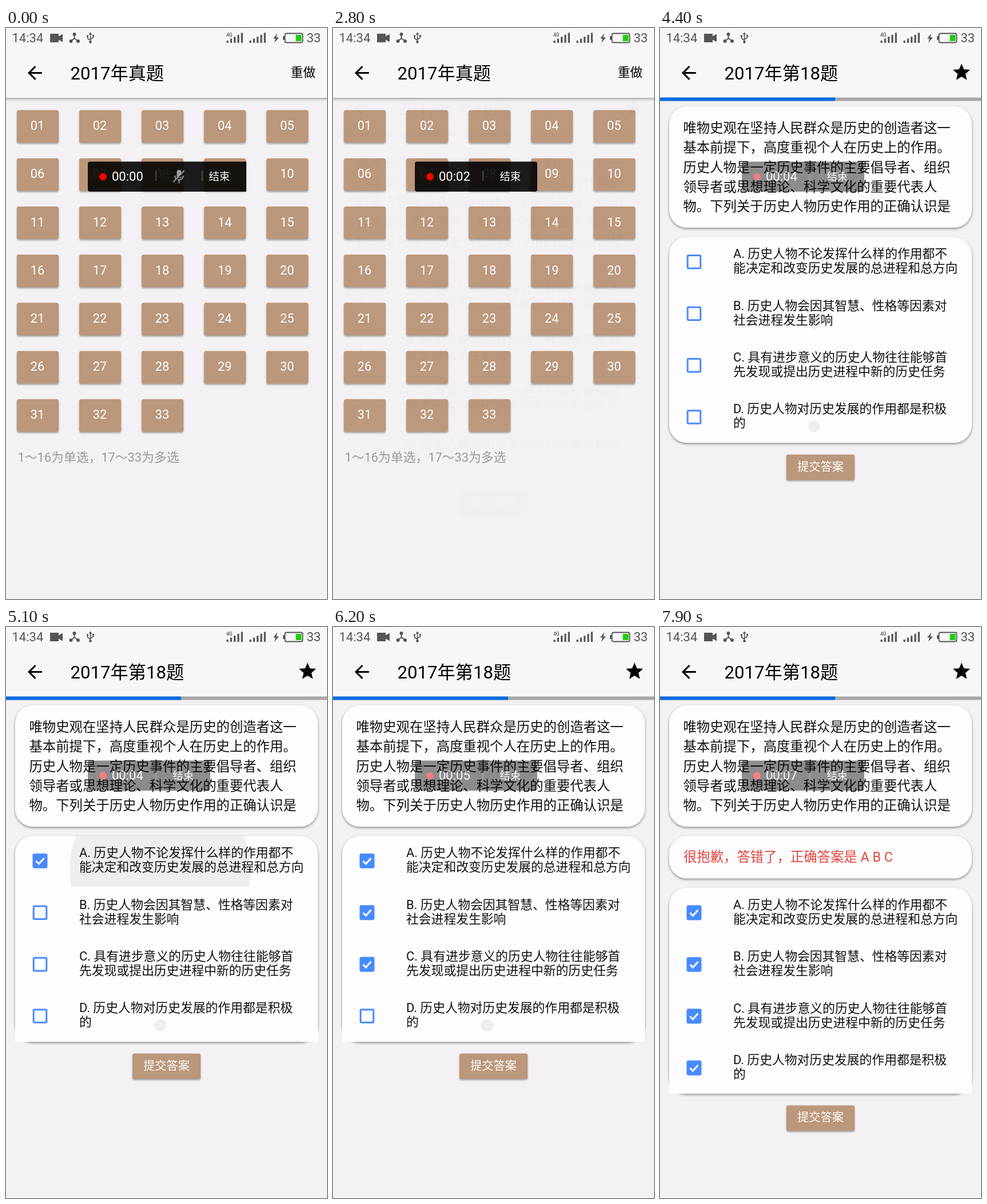
An HTML page for the animation above (8 s loop, 561 px wide and 998 px high).

```html
<!DOCTYPE html>
<html lang="zh-CN">
<head>
<meta charset="utf-8">
<title>真题练习</title>
<style>
html, body { margin: 0; width: 100%; height: 100%; overflow: hidden; background: #f3f1f4; }
svg { display: block; width: 561px; height: 998px; overflow: hidden; }
text { font-family: Roboto, "Noto Sans CJK SC", "Noto Sans CJK", sans-serif; white-space: pre; }
.bar-title { font-size: 31.17px; font-weight: 500; }
.digits { font-weight: 400; }
.small { font-size: 21.8px; }
.body { font-size: 23.37px; fill: #111; }
.mid { text-anchor: middle; }
.status { fill: #555; }
.status text { font-size: 22px; }
.tile { fill: #bb977b; filter: drop-shadow(0 2px 1.5px rgba(0,0,0,.34)); }
.card { fill: #fdfcfe; filter: drop-shadow(0 2.5px 2px rgba(0,0,0,.42)); }

.page, .bar, .wide, .narrow, .result, .moved, .square, .reel, .press {
  animation: 8s linear infinite both;
}
.page { animation-name: enter; }
.bar { animation-name: idle; }
.wide { animation-name: wide; animation-timing-function: step-end; }
.narrow { animation-name: narrow; animation-timing-function: step-end; }
.reel { animation-name: reel; animation-timing-function: step-end; }
.square { animation-name: square; animation-timing-function: step-end; }
.result { animation-name: result; animation-timing-function: step-end; }
.moved { animation-name: moved; animation-timing-function: step-end; }
.press { animation-name: press; }
.edge, .fill, .ripple { animation: 8s linear var(--tap) infinite backwards; }
.edge { stroke: #757575; animation-name: edge; animation-timing-function: step-end; }
.fill { opacity: 0; animation-name: fill; }
.ripple { opacity: 0; transform-box: fill-box; transform-origin: center; animation-name: ripple; }

@keyframes enter {
  0%, 34.98% { opacity: 0; transform: translateY(62px); }
  35% { opacity: .01; transform: translateY(62px); animation-timing-function: cubic-bezier(.36,.66,.04,1); }
  38.5%, 100% { opacity: 1; transform: none; }
}
@keyframes idle { 0%, 38.5% { opacity: 1; } 46.25%, 100% { opacity: .5; } }
@keyframes wide { 0% { visibility: visible; } 1.25%, 100% { visibility: hidden; } }
@keyframes narrow { 0% { visibility: hidden; } 1.25%, 100% { visibility: visible; } }
@keyframes reel {
  0% { transform: none; }
  16.25% { transform: translateY(-30px); }
  28.75% { transform: translateY(-60px); }
  41.25% { transform: translateY(-90px); }
  53.75% { transform: translateY(-120px); }
  66.25% { transform: translateY(-150px); }
  78.75% { transform: translateY(-180px); }
  91.25%, 100% { transform: translateY(-210px); }
}
@keyframes square { 0% { visibility: hidden; } 60%, 100% { visibility: visible; } }
@keyframes result { 0% { visibility: hidden; } 91.875%, 100% { visibility: visible; } }
@keyframes moved { 0% { transform: none; } 91.875%, 100% { transform: translateY(90.6px); } }
@keyframes press {
  0%, 89.4%, 92.5%, 100% { filter: drop-shadow(0 2px 1.5px rgba(0,0,0,.34)); }
  90%, 91.8% { filter: drop-shadow(0 4px 3px rgba(0,0,0,.34)); }
}
/* ticks clear while the question page is hidden */
@keyframes edge { 0% { stroke: #488aff; } 50%, 100% { stroke: #757575; } }
@keyframes fill { 0% { opacity: 0; } 3.5%, 50% { opacity: 1; } 50.01%, 100% { opacity: 0; } }
@keyframes ripple {
  0% { opacity: .06; transform: scale(.04); }
  3.75% { opacity: .06; transform: scale(.608); }
  6.25%, 100% { opacity: 0; transform: scale(1); }
}
</style>
</head>
<body>
<svg viewBox="0 0 561 998">
  <defs>
    <linearGradient id="shade" x2="0" y2="1">
      <stop offset="0" stop-opacity=".3"/>
      <stop offset=".4" stop-opacity=".12"/>
      <stop offset="1" stop-opacity="0"/>
    </linearGradient>
    <clipPath id="clock"><rect x="180" y="246" width="66" height="27"/></clipPath>
    <clipPath id="row"><rect x="16" y="365" width="529" height="88.7"/></clipPath>
    <path id="back" transform="translate(31.7 59.8) scale(1.558)" d="M20 11H7.83l5.59-5.59L12 4l-8 8 8 8 1.41-1.41L7.83 13H20z"/>
  </defs>

  <g>
    <rect width="561" height="998" fill="#f3f1f4"/>
    <rect width="561" height="122" fill="#f8f6f9"/>
    <rect y="122" width="561" height="7" fill="url(#shade)"/>
    <use href="#back"/>
    <text class="bar-title" x="112.5" y="90"><tspan class="digits">2017</tspan>年真题</text>
    <text class="small" x="497.5" y="84.5" font-weight="500">重做</text>
    <g id="grid"></g>
    <text class="small" x="20.5" y="758" fill="#999">1～16为单选，17～33为多选</text>
  </g>

  <g class="page">
    <rect width="561" height="998" fill="#f3f1f4"/>
    <rect width="561" height="122" fill="#f8f6f9"/>
    <rect y="121.5" width="561" height="6" fill="#a8a6a9"/>
    <rect y="121.5" width="306" height="6" fill="#0a6be0"/>
    <use href="#back"/>
    <text class="bar-title" x="112.5" y="90"><tspan class="digits">2017</tspan>年第<tspan class="digits">18</tspan>题</text>
    <path transform="translate(509 59.2) scale(1.5)" d="M12 17.27L18.18 21l-1.64-7.03L22 9.24l-7.19-.61L12 2 9.19 8.63 2 9.24l5.46 4.73L5.82 21z"/>
    <rect class="card" x="16" y="137" width="529" height="212" rx="31"/>
    <g id="question"></g>
    <g class="result">
      <rect class="card" x="16" y="365" width="529" height="74.5" rx="31"/>
      <text x="41" y="410" font-size="23.37" fill="#e2453c">很抱歉，答错了，正确答案是 A B C</text>
    </g>
    <g class="moved">
      <rect class="card" x="16" y="365" width="529" height="360" rx="31"/>
      <rect class="square" x="16" y="636" width="529" height="89" fill="#fdfcfe"/>
      <g id="options"></g>
      <rect class="press" x="221" y="745.5" width="119" height="44.5" rx="3" fill="#bb977b"/>
      <text class="mid" x="280.5" y="773.5" font-size="20.26" font-weight="500" fill="#fff">提交答案</text>
    </g>
  </g>

  <g class="status">
    <text x="10.5" y="25">14:34</text>
    <path d="M77 10h15v4.5l7-4v14l-7-4V25H77z"/>
    <g fill="none" stroke="#555" stroke-width="2">
      <path d="M119.5 11v7l-6 5M119.5 18l6.500 5"/>
      <path d="M147.500 10v14M142.500 14.500v3.500l5 3.500M152.500 13.500v3l-5 3.500" stroke-width="1.600"/>
    </g>
    <circle cx="119.500" cy="11" r="3"/><circle cx="113.500" cy="23" r="3"/><circle cx="126" cy="23" r="3"/>
    <path d="M144.500 11.500l3-4 3 4zM141 12.500h3v3h-3zM151 12h3v3h-3z"/><circle cx="147.500" cy="24.500" r="2.300"/>
    <text x="385" y="14.500" style="font-size:8.5px;font-weight:500">4G</text>
    <g id="signal"></g>
    <path d="M474 9.500l-7 9h4l-2 7.500 8-9.500h-4.500z"/>
    <rect x="487.500" y="9.500" width="31" height="16" rx="3" fill="none" stroke="#555" stroke-width="1.800"/>
    <rect x="484" y="14" width="3" height="7" rx="1"/>
    <rect x="506.500" y="12" width="10" height="11" fill="#22cc12"/>
    <text x="525.500" y="25">33</text>
  </g>

  <g class="bar">
    <path class="wide" d="M147 233.500H420V286H147a4 4 0 0 1-4-4V237.500a4 4 0 0 1 4-4z" fill-opacity=".89"/>
    <rect class="narrow" x="143" y="233.500" width="214" height="52.500" rx="4" fill-opacity=".89"/>
    <circle id="dot" cx="169.500" cy="260" r="6.400" fill="#f00"/>
    <g clip-path="url(#clock)"><g id="reel" class="reel" fill="#fff" font-size="22"></g></g>
    <rect x="260.700" y="250" width="2.600" height="17" fill="#fff" fill-opacity=".17"/>
    <g class="wide">
      <rect x="341.700" y="250" width="2.600" height="17" fill="#fff" fill-opacity=".17"/>
      <rect x="298.500" y="248" width="8" height="15" rx="4" fill="#999"/>
      <path d="M295 258a7.500 7.500 0 0 0 15 0M302.500 265.500v6" fill="none" stroke="#999" stroke-width="2"/>
      <path d="M294 270l19-20" stroke="#181517" stroke-width="2"/>
      <path d="M292.500 269l19-20" stroke="#999" stroke-width="2"/>
      <text x="354.500" y="265.500" font-size="18.300" fill="#fff">结束</text>
    </g>
    <text class="narrow" x="291.500" y="265.500" font-size="18.300" fill="#fff">结束</text>
  </g>
</svg>
<script>
const put = (id, items) => { document.getElementById(id).innerHTML = items.join(''); };
const range = n => [...Array(n).keys()];
const two = n => String(n).padStart(2, '0');

put('grid', range(33).map(i => {
  const x = 19 + (i % 5) * 109.05, y = 143.5 + Math.floor(i / 5) * 84.2;
  return `<rect class="tile" x="${x}" y="${y}" width="73" height="57" rx="3.5"/>
    <text class="small mid" x="${x + 36}" y="${y + 34.7}" fill="#fff">${two(i + 1)}</text>`;
}));

put('question', [
  '唯物史观在坚持人民群众是历史的创造者这一',
  '基本前提下，高度重视个人在历史上的作用。',
  '历史人物是一定历史事件的主要倡导者、组织',
  '领导者或思想理论、科学文化的重要代表人',
  '物。下列关于历史人物历史作用的正确认识是'
].map((s, i) => `<text class="body" x="40.500" y="${183 + i * 34.3}">${s}</text>`));

const options = [
  [4800, 'A. 历史人物不论发挥什么样的作用都不', '能决定和改变历史发展的总进程和总方向'],
  [5300, 'B. 历史人物会因其智慧、性格等因素对', '社会进程发生影响'],
  [5700, 'C. 具有进步意义的历史人物往往能够首', '先发现或提出历史进程中新的历史任务'],
  [6200, 'D. 历史人物对历史发展的作用都是积极', '的']
];
put('options', options.map(([tap, first, second], i) => `
  <g transform="translate(0 ${i * 90.4})" style="--tap:${tap}ms">
    <g clip-path="url(#row)"><circle class="ripple" cx="269.5" cy="425" r="260"/></g>
    <rect class="edge" x="48.2" y="397.500" width="22.600" height="22.600" rx="1.500" fill="none" stroke-width="3"/>
    <g class="fill">
      <rect x="46.700" y="396" width="25.600" height="25.600" rx="3" fill="#488aff"/>
      <path d="M52.500 409l5 5 9-10" fill="none" stroke="#fff" stroke-width="3"/>
    </g>
    <text class="small" x="128" y="402.300" fill="#111">${first}</text>
    <text class="small" x="128" y="427.300" fill="#111">${second}</text>
  </g>`));

put('signal', range(10).map(i => {
  const k = i % 5, left = i < 5 ? 385.5 : 425.5, h = 4 + k * 3.4;
  return `<rect x="${left + k * 6.3}" y="${26 - h}" width="3.2" height="${h}"/>`;
}));

put('reel', range(8).map(i => `<text x="185" y="${267 + i * 30}">00:${two(i)}</text>`));

// record light pulses every 1.2 s
const pulse = t => t < 100 ? 1 : Math.min(1, .85 - .25 * Math.cos(2 * Math.PI * (t - 1120) / 1200));
document.getElementById('dot').animate(
  range(81).map(i => ({ opacity: pulse(i * 100) })),
  { duration: 8000, iterations: Infinity }
);
</script>
</body>
</html>
```
